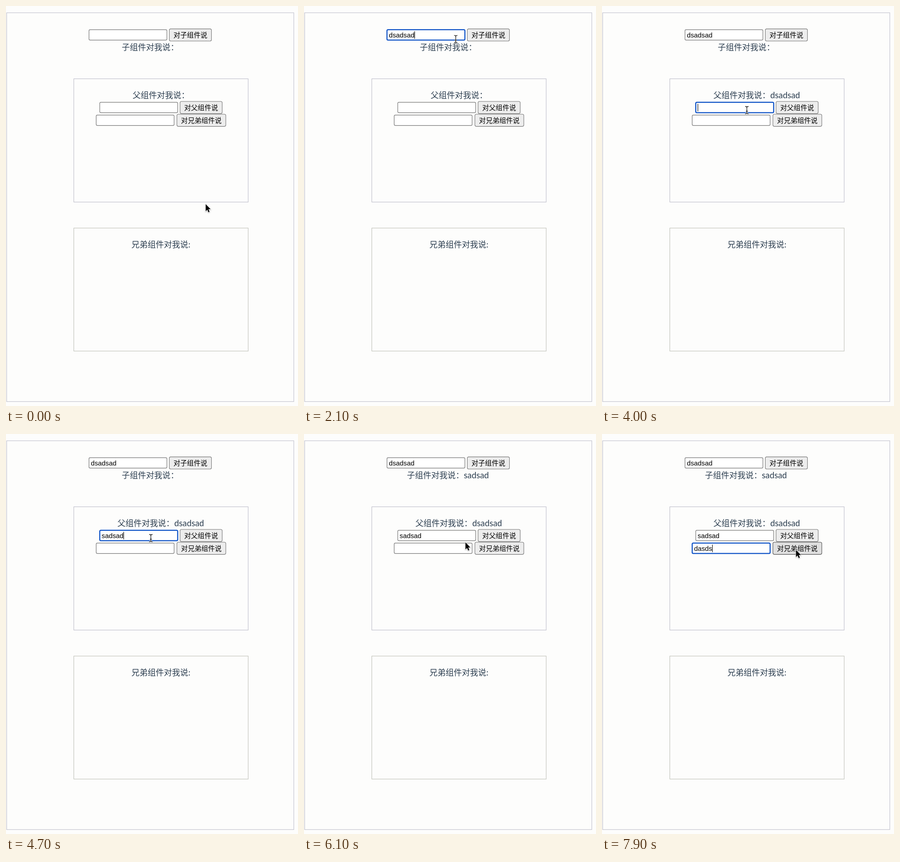
Recreate the animation shown at these times as an HTML page. Size 639 by 876 pixels, loop 8000 ms.

```html
<!DOCTYPE html>
<html lang="zh-CN">
<head>
<meta charset="utf-8">
<style>
  html, body { margin: 0; width: 639px; height: 876px; overflow: hidden; background: #fdfdfc; }
  svg { display: block; }
  text { white-space: pre; }
  .label { font: 17.8px "Noto Sans CJK SC", "Noto Sans CJK", sans-serif; fill: #2c3e50; }
  .message { font: 18.4px Lato, sans-serif; fill: #2c3e50; }
  .value { font: 14.8px "Liberation Sans", Arial, sans-serif; }
  .caption { font: 14.8px "Noto Sans CJK SC", "Noto Sans CJK", sans-serif; text-anchor: middle; }
</style>
</head>
<body>
<svg id="stage" width="639" height="876" viewBox="0 0 639 876"></svg>
<script>
const LOOP = 8000, STEP = 100;
const stage = document.getElementById('stage');

function add(tag, attrs, text = '', parent = stage) {
  const el = document.createElementNS('http://www.w3.org/2000/svg', tag);
  set(el, attrs);
  el.textContent = text;
  return parent.appendChild(el);
}
function set(el, attrs) {
  for (const key in attrs) el.setAttribute(key, attrs[key]);
}
const show = (el, on) => set(el, { visibility: on ? 'visible' : 'hidden' });
const inside = (p, r) => p.x >= r.x && p.x <= r.x + r.width && p.y >= r.y && p.y <= r.y + r.height;

function panel(x, y, width, height, stroke) {
  add('rect', { x, y, width, height, stroke, fill: 'none', 'stroke-width': 1.1 });
}
panel(1.5, 14.8, 628.3, 851.5, '#bfbfcb');
panel(148.4, 159.4, 381.6, 270, '#bdbdca');
panel(148.4, 486.3, 381.6, 269.4, '#bfc0b8');

// Centred label whose message, once received, follows the colon.
function makeLabel(caption, center, baseline, width, message = '', messageWidth = 0, since = Infinity) {
  const label = add('text', { class: 'label', y: baseline }, caption);
  const reply = add('text', { class: 'message', y: baseline }, message);
  return {
    area: { x: center - width / 2, y: baseline - 16, width, height: 20 },
    update(t) {
      const received = t >= since;
      const left = center - (width + (received ? messageWidth : 0)) / 2;
      set(label, { x: left });
      set(reply, { x: left + width });
      show(reply, received);
    }
  };
}
const labels = [
  makeLabel('子组件对我说：', 315.5, 96.6, 124.6, 'sadsad', 56, 5400),
  makeLabel('父组件对我说：', 339.2, 201.8, 124.6, 'dsadsad', 66.5, 2700),
  makeLabel('兄弟组件对我说:', 339.2, 528.5, 129.6)
];

// One input with its button; times in ms.
function makeRow(x, y, buttonX, buttonWidth, caption, value, time) {
  const input = { x, y: y - 11.4, width: 170.5, height: 22.8 };
  const button = { x: buttonX, y: y - 13.2, width: buttonWidth, height: 26.6 };
  const field = add('rect', { ...input, rx: 2.4, fill: '#fff' });
  const text = add('text', { class: 'value', x: x + 4.1, y: y + 5.3 });
  const caret = add('rect', { y: y - 8, width: 1.1, height: 16.5 });
  const face = add('rect', { ...button, rx: 3, 'stroke-width': 1.1 });
  add('text', { class: 'caption', x: buttonX + buttonWidth / 2, y: y + 5.5 }, caption);
  return {
    input,
    update(t, pointer) {
      const focused = t >= time.focus && t < time.press;
      const gap = (time.typed - time.typing) / (value.length - 1);
      const count = t < time.typing ? 0 : Math.min(value.length, Math.floor((t - time.typing) / gap + 1.001));
      const activity = count ? time.typing + (count - 1) * gap : time.focus;
      const hoverInput = inside(pointer, input), hover = inside(pointer, button);
      const pressed = hover && t >= time.press && t < time.press + 100;
      text.textContent = value.slice(0, count);
      set(field, {
        stroke: focused ? '#0b50c6' : hoverInput ? '#222' : '#767676',
        'stroke-width': focused ? 2.3 : 1.2
      });
      set(caret, { x: x + 4.1 + (count ? text.getComputedTextLength() : 0) });
      show(caret, focused && (t - activity) % 1000 < 500);
      set(face, {
        fill: pressed ? '#f5f5f5' : hover ? '#e0e0e0' : '#ededed',
        stroke: pressed ? '#8d8d8d' : hover ? '#4f4f4f' : '#767676'
      });
    }
  };
}
const rows = [
  makeRow(181.6, 63.3, 357.4, 92.2, '对子组件说', 'dsadsad', { focus: 1000, typing: 1300, typed: 1900, press: 2600 }),
  makeRow(205.2, 222.2, 380.9, 92.2, '对父组件说', 'sadsad', { focus: 3800, typing: 4200, typed: 4700, press: 5300 }),
  makeRow(197.4, 250.2, 374, 107, '对兄弟组件说', 'dasds', { focus: 6800, typing: 7100, typed: 7500, press: LOOP })
];

const arrow = add('g', { style: 'filter: drop-shadow(0 1px 1px rgba(0,0,0,.3))' });
add('path', {
  d: 'M0 0V15.4L3.5 12.1L5.9 17.8L8.5 16.7L6.1 11.1H10.8Z',
  stroke: '#fff', 'stroke-width': 1.6, 'paint-order': 'stroke'
}, '', arrow);
const beam = add('g', { fill: 'none' });
const beamPath = 'M-3.6 -8Q-.5 -8 0 -6.2Q.5 -8 3.6 -8M0 -6.2V6.2M-3.6 8Q-.5 8 0 6.2Q.5 8 3.6 8M-2 2.3H2';
add('path', { d: beamPath, stroke: '#fff', 'stroke-width': 3 }, '', beam);
add('path', { d: beamPath, stroke: '#111', 'stroke-width': 1.3 }, '', beam);

// Pointer stops: time, x, y.
const route = [
  [0, 437, 434], [400, 416, 335], [600, 386, 250], [700, 350, 222], [900, 292, 90],
  [1000, 284.5, 74], [1900, 284.5, 74], [2400, 403.5, 70], [2900, 403.5, 70],
  [3300, 380, 130], [3700, 317, 228], [4700, 317, 228], [5200, 412, 218],
  [5700, 412, 218], [6300, 324, 247], [7400, 324, 247], [7800, 424.5, 254], [LOOP, 424.5, 254]
];
function pointerAt(t) {
  const i = route.findIndex(stop => stop[0] > t);
  const [t0, x0, y0] = route[i - 1], [t1, x1, y1] = route[i];
  const k = (t - t0) / (t1 - t0);
  return { x: x0 + (x1 - x0) * k, y: y0 + (y1 - y0) * k };
}

function render(t) {
  const pointer = pointerAt(t);
  labels.forEach(label => label.update(t));
  rows.forEach(row => row.update(t, pointer));
  const overText = rows.some(row => inside(pointer, row.input)) || labels.some(label => inside(pointer, label.area));
  const transform = `translate(${pointer.x} ${pointer.y})`;
  set(arrow, { transform });
  set(beam, { transform });
  show(arrow, !overText);
  show(beam, overText);
}

const start = performance.now();
function tick() {
  const elapsed = (performance.now() - start) % LOOP;
  render(Math.floor(elapsed / STEP) * STEP);
  requestAnimationFrame(tick);
}
tick();
</script>
</body>
</html>
```
